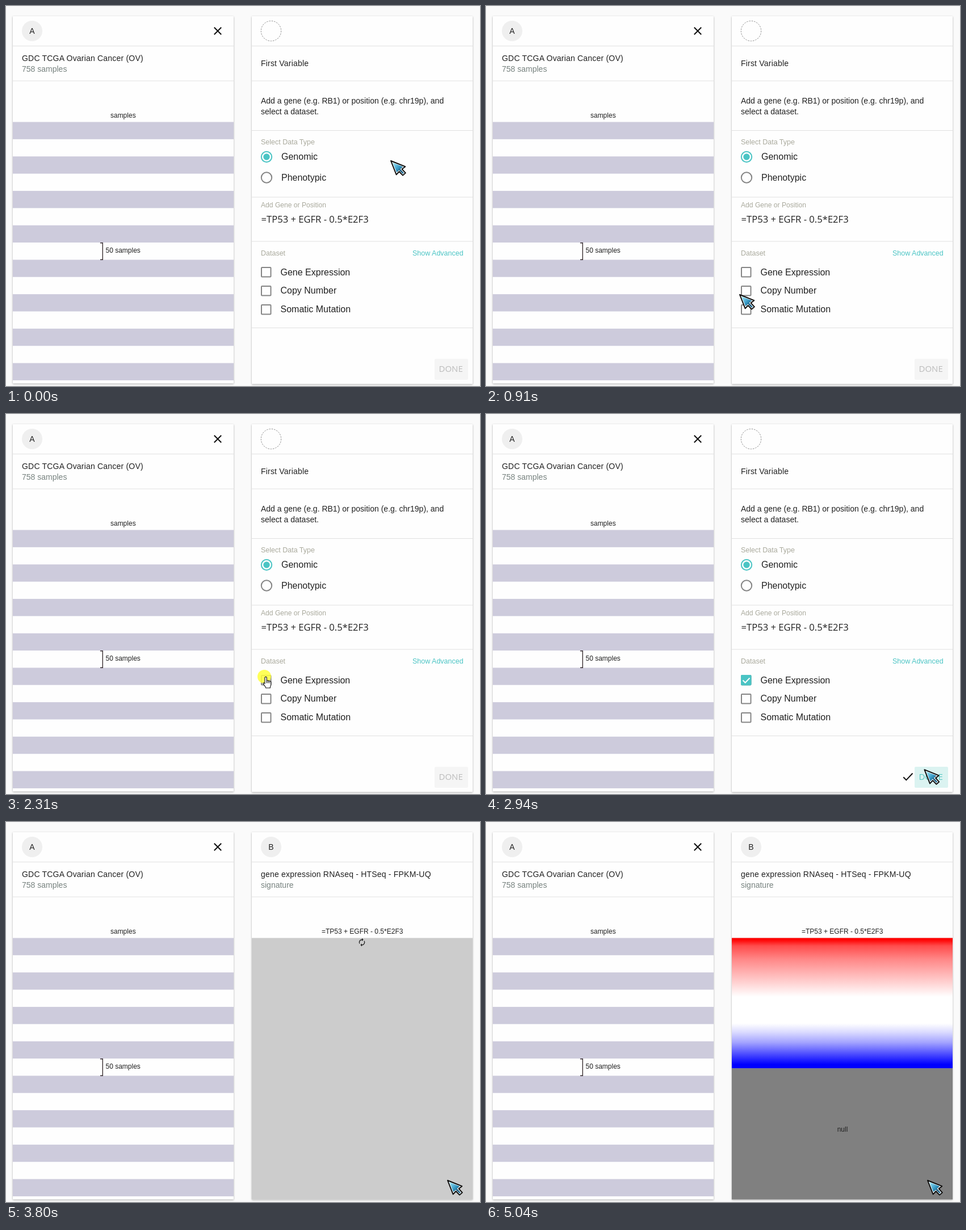
An HTML page that plays this animation: 835x670 px, repeating every 5.89 s.

```html
<!DOCTYPE html>
<html lang="en">
<head>
<meta charset="utf-8">
<title>Add a variable</title>
<style>
  html, body { margin: 0; width: 100%; height: 100%; overflow: hidden; background: #fafafa; }
  svg { display: block; width: 835px; height: 670px; font: 14px "Liberation Sans", Arial, sans-serif; fill: #212121; }
  .panel { fill: #fefefe; filter: drop-shadow(0 1px 1.5px rgba(0, 0, 0, .32)); }
  .rule { stroke: #e1e1e1; fill: none; }
  .badge { fill: #efefef; }
  .title { letter-spacing: .2px; }
  .sub { fill: #77827f; }
  .label { font-size: 12.5px; fill: #a9a99c; }
  .option { font-size: 16px; }
  .small { font-size: 12px; }
  .mid { text-anchor: middle; }
  .teal { fill: #4ac4c4; }
  .wide { font-family: "Open Sans", "Noto Sans", sans-serif; }
  .ring { fill: none; stroke: #858585; stroke-width: 2; }
  .ink { fill: none; stroke: #111; stroke-width: 2; }
</style>
</head>
<body>
<svg viewBox="0 0 835 670">
  <defs>
    <linearGradient id="heat" x1="0" y1="0" x2="0" y2="1">
      <stop offset="0" stop-color="#f00"/>
      <stop offset=".018" stop-color="#ff0808"/>
      <stop offset=".06" stop-color="#ff4c4c"/>
      <stop offset=".16" stop-color="#ff8686"/>
      <stop offset=".3" stop-color="#ffc0c0"/>
      <stop offset=".45" stop-color="#fff"/>
      <stop offset=".655" stop-color="#fff"/>
      <stop offset=".72" stop-color="#dcdcff"/>
      <stop offset=".8" stop-color="#a4a4ff"/>
      <stop offset=".87" stop-color="#6060ff"/>
      <stop offset=".94" stop-color="#1c1cff"/>
      <stop offset=".97" stop-color="#00f"/>
      <stop offset="1" stop-color="#00f"/>
    </linearGradient>
    <linearGradient id="steel" x1="0" y1="0" x2="1" y2="1">
      <stop offset=".1" stop-color="#8fdcf2"/>
      <stop offset=".5" stop-color="#3598c4"/>
      <stop offset=".75" stop-color="#1f5878"/>
      <stop offset="1" stop-color="#2f86b0"/>
    </linearGradient>
    <clipPath id="buttonClip"><rect x="755" y="622" width="59" height="37" rx="2"/></clipPath>
  </defs>

  <rect class="panel" x="12" y="18" width="389" height="647.5" rx="1"/>
  <path class="rule" d="M12 70.5h389M12 132h389"/>
  <circle class="badge" cx="46" cy="44" r="18"/>
  <text class="mid" x="46" y="49">A</text>
  <path class="ink" d="M366.8 37.8l12.4 12.4m0-12.4l-12.4 12.4"/>
  <text class="title" x="28" y="96.5">GDC TCGA Ovarian Cancer (OV)</text>
  <text class="sub" x="28" y="116">758 samples</text>
  <text class="small mid" x="206.3" y="197">samples</text>
  <g id="bands" fill="#cdcbdc"></g>
  <path d="M166 417.8h4.3v29.4h-4.3" fill="none" stroke="#3d3336" stroke-width="1.4"/>
  <text class="small" x="175.5" y="435">50 samples</text>

  <g id="form">
    <rect class="panel" x="433" y="18" width="389" height="648.5" rx="1"/>
    <path class="rule" d="M433 70.5h389M433 132h389M433 219.5h389M433 337h389M433 415h389M433 567.5h389"/>
    <circle cx="467" cy="44" r="17.7" fill="none" stroke="#8c8c8c" stroke-dasharray="2.6 1.8"/>
    <text class="title" x="449" y="106">First Variable</text>
    <text x="449" y="172">Add a gene (e.g. RB1) or position (e.g. chr19p), and</text>
    <text x="449" y="191">select a dataset.</text>
    <text class="label" x="449" y="244">Select Data Type</text>
    <circle class="ring" cx="459" cy="266" r="9.2" style="stroke:#4ac4c4"/>
    <circle class="teal" cx="459" cy="266" r="5.7"/>
    <text class="option" x="485" y="271">Genomic</text>
    <circle class="ring" cx="459" cy="302.5" r="9.2"/>
    <text class="option" x="485" y="308">Phenotypic</text>
    <text class="label" x="449" y="355" style="font-size:12.1px">Add Gene or Position</text>
    <text class="wide" x="449.5" y="382" font-size="16.6">=TP53 + EGFR - 0.5*E2F3</text>
    <text class="label" x="449" y="439.5">Dataset</text>
    <text class="label teal" x="716" y="439.5" style="fill:#4ac4c4">Show Advanced</text>
    <rect class="ring" x="450" y="461" width="16.5" height="16.5" rx="1"/>
    <rect class="ring" x="450" y="494" width="16.5" height="16.5" rx="1"/>
    <rect class="ring" x="450" y="527" width="16.5" height="16.5" rx="1"/>
    <circle id="boxRipple" class="teal" cx="458" cy="469" r="0" opacity=".3"/>
    <rect id="boxFill" class="teal" x="449" y="460" width="18.5" height="18.5" rx="2"/>
    <path id="tick" d="M452.5 469.5l4.2 4.2 7.8-8.2" fill="none" stroke="#fff" stroke-width="2"/>
    <text class="option" x="483.5" y="474.5">Gene Expression</text>
    <text class="option" x="483.5" y="507">Copy Number</text>
    <text class="option" x="483.5" y="540">Somatic Mutation</text>
    <path id="ready" class="ink" d="M735.3 640.2l5 5.2L751.5 633.5"/>
    <rect id="button" x="755" y="622" width="59" height="37" rx="2"/>
    <circle id="buttonRipple" cx="777" cy="631" r="0" fill="#aee5e1" clip-path="url(#buttonClip)"/>
    <text id="done" class="wide" x="762.5" y="645" font-size="15">DONE</text>
  </g>

  <g id="chart">
    <rect class="panel" x="433" y="18" width="389" height="647.5" rx="1"/>
    <path class="rule" d="M433 70.5h389M433 132h389"/>
    <circle class="badge" cx="467" cy="44" r="18"/>
    <text class="mid" x="467" y="49">B</text>
    <text class="title" x="449" y="96.5">gene expression RNAseq - HTSeq - FPKM-UQ</text>
    <text class="sub" x="449" y="116">signature</text>
    <text class="small mid" x="627.7" y="197">=TP53 + EGFR - 0.5*E2F3</text>
    <rect x="433" y="204.5" width="389" height="461" fill="#ccc"/>
    <g id="spinner">
      <path d="M12 6v3l4-4-4-4v3a8 8 0 0 0-6.76 12.26L6.7 14.8A6 6 0 0 1 12 6zm6.76 1.74L17.3 9.2A6 6 0 0 1 12 18v-3l-4 4 4 4v-3a8 8 0 0 0 6.76-12.26z" transform="scale(.667) translate(-12 -12)"/>
    </g>
    <g id="result">
      <rect x="433" y="204.5" width="389" height="230" fill="url(#heat)"/>
      <rect x="433" y="434.3" width="389" height="231.2" fill="#808080"/>
      <text class="small mid" x="628" y="545.5">null</text>
    </g>
  </g>

  <circle id="halo" r="12" fill="#ffff3c" opacity=".85"/>
  <g id="arrow" stroke-linejoin="round">
    <path d="M1 1L26.3 11.2 20.6 15.6 26.8 22.4 22 26.6 15.6 20 10.6 25.4z" fill="#fff" stroke="#0a0a0a" stroke-width="1.9"/>
    <path d="M4 4L22.3 11.6 17.6 15.5 24 22.3 21.9 24.1 15.4 17.4 11.3 21.6z" fill="url(#steel)"/>
  </g>
  <path id="hand" d="M4 13V2.2a1.7 1.7 0 0 1 3.3 0V8c.6-1.2 2.4-.9 2.6.4.7-1 2.3-.6 2.5.6.9-.8 2.4-.2 2.4 1.2v4.2c0 2.2-1.5 3-1.5 6.1H5.6c0-2.4-3.1-4.2-4.8-8 .3-1.6 2-1.2 3.2.5zM7.3 8v4M9.9 9v3M12.4 10v2" fill="#fff" stroke="#111" stroke-width="1.15" stroke-linejoin="round"/>
</svg>
<script>
  const LOOP = 5890;
  const ui = {};
  document.querySelectorAll('svg [id]').forEach(el => { ui[el.id] = el; });

  const bandHeight = 50 / 758 * 460.3;
  for (let i = 0; i < 8; i++) {
    const band = document.createElementNS('http://www.w3.org/2000/svg', 'rect');
    const box = { x: 12, y: 204.5 + 2 * i * bandHeight, width: 389, height: bandHeight };
    for (const key in box) band.setAttribute(key, box[key]);
    ui.bands.append(band);
  }

  const show = (el, on) => { el.style.display = on ? '' : 'none'; };
  const place = (el, [x, y]) => el.setAttribute('transform', `translate(${x} ${y})`);
  const ease = u => u * u * (3 - 2 * u);

  // Share of n discrete updates, spread from a to b, made by time t
  const stepped = (t, a, b, n) =>
    t < a ? 0 : Math.min(n, Math.floor((t - a) / (b - a) * (n - 1) + .06) + 1) / n;

  function along(points, u) {
    const s = u * (points.length - 1);
    const i = Math.min(points.length - 2, Math.floor(s));
    return points[i].map((v, k) => v + (points[i + 1][k] - v) * (s - i));
  }

  const moves = [
    { a: 70, b: 600, n: 8, path: [[677, 272], [478, 516]], ease },
    { a: 680, b: 1220, n: 8, path: [[478, 516], [460, 519], [446, 508], [447, 490], [455, 477]] },
    { a: 1300, b: 1450, n: 3, path: [[457, 476], [452, 462.5]] },
    { a: 2540, b: 2860, n: 5, path: [[457, 464], [770, 625]], ease },
    { a: 2940, b: 3260, n: 5, path: [[770, 625], [777, 631]] }
  ];

  function pointer(t) {
    const move = moves.filter(m => t >= m.a).pop() || moves[0];
    const u = stepped(t, move.a, move.b, move.n);
    return along(move.path, move.ease ? move.ease(u) : u);
  }

  function draw(t) {
    const saved = t >= 3800;
    show(ui.form, !saved);
    show(ui.chart, saved);

    const pos = pointer(t);
    const pointing = t >= 1300 && t < 2540;
    show(ui.arrow, !pointing);
    show(ui.hand, pointing);
    place(pointing ? ui.hand : ui.arrow, pos);

    const firstClick = t >= 2310 && t < 2460;
    show(ui.halo, firstClick || (t >= 3550 && t < 3720));
    place(ui.halo, firstClick ? [455, 463] : [777, 631]);

    ui.boxRipple.setAttribute('r', t < 2700 ? 21 * stepped(t, 2390, 2540, 3) : 0);
    show(ui.boxFill, t >= 2620);
    show(ui.tick, t >= 2940);

    const enabled = t >= 2940;
    show(ui.ready, enabled);
    ui.button.setAttribute('fill', enabled ? '#dbf3f1' : '#f5f5f5');
    ui.done.setAttribute('fill', enabled ? '#55c6c2' : '#bcbcbc');
    ui.buttonRipple.setAttribute('r', 17.5 * stepped(t, 3640, 3720, 2));

    const turns = stepped(t, 4010, 4180, 3) + stepped(t, 4330, 4560, 4) + stepped(t, 4730, 4960, 4);
    ui.spinner.setAttribute('transform', `translate(627 212.2) rotate(${180 * turns})`);
    show(ui.spinner, t < 5040);
    show(ui.result, t >= 5040);
  }

  const start = performance.now();
  function tick() {
    draw((performance.now() - start) % LOOP);
    requestAnimationFrame(tick);
  }
  tick();
</script>
</body>
</html>
```
